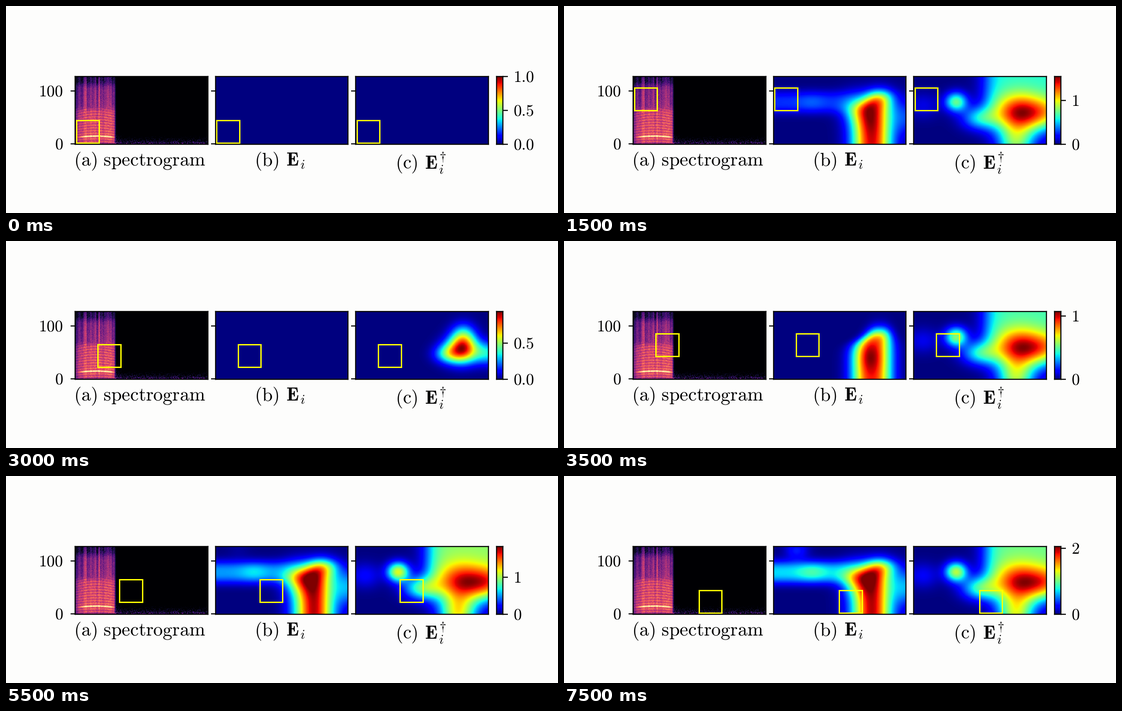
Recreate the animation shown at these times as a matplotlib script. Size 1222 by 458 pixels, loop 8 s.

```python
import numpy as np
import matplotlib.pyplot as plt
from matplotlib.animation import FuncAnimation
from matplotlib.patches import Rectangle

W, H = 1222, 458
PT = 0.72                      # points per pixel at 100 dpi
ROWS, COLS = 128, 250
TOP, BOTTOM, PANEL_W = 156.3, 306.0, 293.5
FRAMES, PER_COLUMN = 16, 5

plt.rcParams.update({
    "mathtext.fontset": "cm",
    "text.hinting": "none",
    "axes.linewidth": 2.4 * PT,
    "ytick.major.size": 10.5 * PT,
    "ytick.major.width": 2.4 * PT,
})

# Panel-relative pixel coordinates, y measured down from the top edge
PX, PY = np.meshgrid((np.arange(COLS) + 0.5) * PANEL_W / COLS,
                     (ROWS - np.arange(ROWS) - 0.5) * (BOTTOM - TOP) / ROWS)


def sigmoid(t):
    return 1 / (1 + np.exp(-t))


def blob(x, y, sx, sy, amp):
    return amp * np.exp(-((PX - x) / sx) ** 2 / 2 - ((PY - y) / sy) ** 2 / 2)


def ridge(head, lean, width, taper, power):
    """Upright ridge with a soft top at `head`, leaning right as it narrows."""
    t = sigmoid((head + 18 - PY) / 9)
    shape = np.exp(-(np.abs(PX - 217 - lean * t) / (width - taper * t)) ** power)
    return shape * sigmoid((PY - head) / 8.5)


def make_spectrogram():
    rng = np.random.default_rng(4)
    row, col = np.mgrid[:ROWS, :COLS]
    grain = rng.normal(0, 1, (ROWS, COLS))
    streak = np.convolve(rng.normal(0, 1, COLS), [.3, .5, .3], "same")
    bars = sum(np.exp(-((col - c) / 2.5) ** 2) for c in (18, 39, 45, 52, 61))

    # Voiced part: arched harmonics over a level that drops with frequency
    bend = ((col - 39) / 32) ** 2
    freq = row * (1 + 0.05 * bend) + 1.2 * bend
    level = (.12 + .21 * sigmoid((112 - row) / 3) + .17 * sigmoid((66 - row) / 2)
             + .15 * (1 - row / ROWS) - .22 * np.exp(-row / 4))
    low = sigmoid((66 - row) / 3)
    voice = (level + .08 * low * np.cos(2 * np.pi * (freq - 15) / 5.2)
             + .05 * grain + (.09 - .05 * low) * streak + .10 * bars * (1 - low))
    voice *= (1 - .5 * np.exp(-col / 7)) * sigmoid((74.5 - col) / .8)
    core = sigmoid((col - 9) / 2) * sigmoid((70 - col) / 2)
    voice += .36 * core * np.exp(-((freq - 15) / 1.6) ** 2)

    # Background noise that hugs the lowest rows
    edge = np.exp(-np.abs(col - 77) / 7)
    noise = rng.random((ROWS, COLS)) ** 2 * (
        .5 * np.exp(-row / 4) + (.22 + .3 * edge) * np.exp(-row / 15)) - .06
    return np.clip(np.maximum(voice * (col < 78), noise * (col > 74)), 0, 1)


NARROW = .87 * ridge(44, 18, 43, 18, 2.35) + blob(213, 102, 18, 22, .13)
WIDE = (.95 * ridge(36, 18, 43, 8, 2) + blob(183, 66, 24, 24, .33)
        + blob(294, 90, 22, 28, .26))
WING = (.34 * sigmoid((170 - PX) / 15) * np.exp(-(np.abs(PY - 57) / 25) ** 2.5)
        + blob(85, 56, 22, 14, .10))
SPOT = blob(51, 8, 18, 14, .15)

LONE = (blob(234, 86, 25, 20, .80) + blob(238, 56, 19, 20, .40)
        + blob(294, 92, 24, 18, .33) + blob(200, 94, 20, 14, .25))
CORE = blob(232, 84, 38, 30, .60)
SPREAD = (.45 * sigmoid((PX - 161) / 12) * sigmoid((90 - PY) / 18)
          + blob(294, 84, 35, 25, .35) + blob(226, 150, 28, 30, .50)
          + blob(146, 92, 28, 18, .35) + blob(94, 56, 17, 15, .52)
          + blob(21, 64, 25, 20, .10))


def peak_at(i):
    """Top of the colour scale; it starts low again with the second column."""
    if i < PER_COLUMN:
        return np.interp(i, [0, 1, 2, 4], [1, .935, 1.087, 2])
    return np.interp(i, [6, 7, 9, 11, 13, 15], [.938, 1.07, 1.07, 1.83, 2.09, 2.05])


def map_b(top):
    if top <= 1:
        return np.zeros((ROWS, COLS))
    wide, wing, spot = np.clip([(top - 1.1) / .7, (top - 1.1) / .9,
                                (top - 1.8) / .2], 0, 1)
    return (1 - wide) * NARROW + wide * WIDE + wing * WING + spot * SPOT


def map_c(i, top):
    if i == 0:
        return np.zeros((ROWS, COLS))
    k = np.interp(i, [2, 4, 7, 9, 11, 15], [1, .65, .95, .95, 1.35, 1.15])
    out = LONE if top < 1 else CORE + k * SPREAD
    return out / out.max()


fig = plt.figure(figsize=(12.22, 4.58), dpi=100, facecolor="#fdfdfc")


def add_axes(left, width):
    ax = fig.add_axes([left / W, 1 - BOTTOM / H, width / W, (BOTTOM - TOP) / H])
    ax.set_xticks([])
    return ax


def label(x, y, text, size=36, ha="left"):
    return fig.text(x / W, 1 - y / H, text, fontsize=size * PT, ha=ha,
                    va="baseline", color="black")


def rm(text):
    return r"$\mathrm{%s}$" % text


images, boxes = [], []
for n, cmap in enumerate(("magma", "jet", "jet")):
    ax = add_axes(153 + 310.5 * n, PANEL_W)
    images.append(ax.imshow(np.zeros((ROWS, COLS)), cmap=cmap, vmin=0, vmax=1,
                            origin="lower", aspect="auto"))
    ax.set_yticks([0, 100], labels=["", ""])
    boxes.append(ax.add_patch(Rectangle((2, 2), 43, 43, fill=False,
                                        ec="#ffff00", lw=3 * PT)))
images[0].set_data(make_spectrogram())

bar = add_axes(1085.8, 14.6)
bar.imshow(np.linspace(0, 1, 256)[:, None], cmap="jet", origin="lower",
           aspect="auto", extent=(0, 1, 0, 1))
bar.yaxis.tick_right()

label(127, 200, rm("100"), ha="right")
label(127, 317.5, rm("0"), ha="right")
label(149.5, 353, rm(r"(a)\ spectrogram"), 42)
label(549.5, 353, rm(r"(b)\ "), 42)
label(620, 353, r"$\mathbf{E}$", 42)
label(651, 359.5, "$i$", 29.4)
label(862, 360, rm(r"(c)\ "), 42)
label(927, 360, r"$\mathbf{E}$", 42)
label(958, 370.5, "$i$", 29.4)
label(959, 342, r"$\dagger$", 29.4)
bar_labels = [label(1123, 318, "") for _ in range(3)]


def update(i):
    top = peak_at(i)
    images[1].set_data(map_b(top))
    images[2].set_data(map_c(i, top))

    col, row = divmod(i, PER_COLUMN)
    for box in boxes:
        box.set_xy((2 + 40.5 * col, 2 + 20.5 * row))

    step = 0.5 if top <= 1 else 1 if top < 2 else 2
    ticks = np.arange(0, top + 1e-6, step)
    bar.set_yticks(ticks / top, labels=[""] * len(ticks))
    for text in bar_labels:
        text.set_text("")
    for text, tick in zip(bar_labels, ticks):
        text.set_text(rm("%.1f" % tick if step < 1 else "%d" % tick))
        text.set_y(1 - (BOTTOM - (BOTTOM - TOP) * tick / top + 12) / H)
    return images + boxes + bar_labels


anim = FuncAnimation(fig, update, frames=FRAMES, interval=500,
                     repeat=True, repeat_delay=0, blit=False)
plt.show()
```
